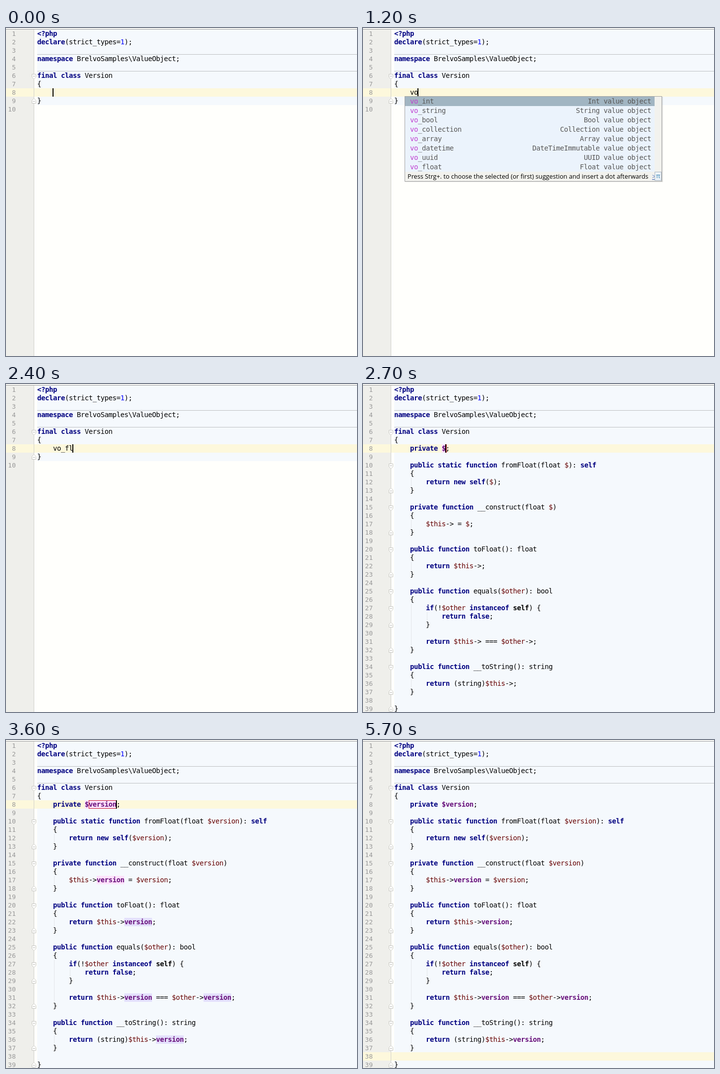
Animation of 709 by 664 pixels, one loop 6000 ms. Source, as an HTML page:

```html
<!DOCTYPE html>
<html lang="en">
<head>
<meta charset="utf-8">
<title>Live template typing</title>
<style>
  html, body { margin: 0; width: 100%; height: 100%; overflow: hidden; background: #fffffc; }
  svg { display: block; }
  text { font-family: "DejaVu Sans Mono", monospace; font-size: 14px; white-space: pre; }
  .num { font-size: 13px; fill: #999; }
  .kw { font-weight: bold; fill: #000080; }
  .strong { font-weight: bold; }
  .field { font-weight: bold; fill: #660e7a; }
  .var { fill: #660000; }
  .lit { fill: #0000ff; }
  .item { fill: #585858; }
  .hit { fill: #bf3fd0; }
  .hint { font-family: "Open Sans", sans-serif; font-size: 12.7px; }
  .link { fill: #4a6fc0; text-decoration: underline; }
</style>
</head>
<body>
<svg id="stage" width="709" height="664" viewBox="0 0 709 664"></svg>
<script>
const LOOP = 6000, LEFT = 63, CELL = 8, ROW = 17, TOP = 3;
const stage = document.getElementById('stage');

const HEAD = [
  '<?php', 'declare(strict_types=1);', '',
  'namespace BrelvoSamples\\ValueObject;', '',
  'final class Version', '{'
];
// "@" stands for the property name being typed
const BODY = `    private $@;

    public static function fromFloat(float $@): self
    {
        return new self($@);
    }

    private function __construct(float $@)
    {
        $this->@ = $@;
    }

    public function toFloat(): float
    {
        return $this->@;
    }

    public function equals($other): bool
    {
        if(!$other instanceof self) {
            return false;
        }

        return $this->@ === $other->@;
    }

    public function __toString(): string
    {
        return (string)$this->@;
    }
`.split('\n');

const KEYWORDS = new Set(('<?php declare namespace final class private public static ' +
  'function return new self if instanceof false').split(' '));
const FOLD_STARTS = [10, 15, 20, 25, 27, 34];
const FOLD_ENDS = [13, 18, 23, 29, 32, 37];
const GUIDES = [[4, 12, 12], [4, 17, 17], [4, 22, 22], [4, 27, 31], [8, 28, 28], [4, 36, 36]];
const ITEMS = [
  ['int', 'Int'], ['string', 'String'], ['bool', 'Bool'], ['collection', 'Collection'],
  ['array', 'Array'], ['datetime', 'DateTimeImmutable'], ['uuid', 'UUID'], ['float', 'Float']
];

const TYPED = [[0, ''], [1000, 'v'], [1100, 'vo'], [1500, 'vo_'], [1700, 'vo_f'], [1800, 'vo_fl']];
const NAME = [[2500, ''], [2800, 'v'], [3100, 'ver'], [3200, 'vers'],
  [3400, 'versi'], [3500, 'versio'], [3600, 'version']];
const CARET = [[0, true], [300, false], [1000, true], [4800, false], [5300, true], [5700, false]];

const valueAt = (steps, t) => steps.reduce((v, [start, next]) => t >= start ? next : v, steps[0][1]);
const within = (t, a, b) => t >= a && t < b;
const rowY = line => TOP + (line - 1) * ROW;
const colX = col => LEFT + col * CELL;
const escape = s => s.replace(/&/g, '&amp;').replace(/</g, '&lt;').replace(/>/g, '&gt;');
const rect = (x, y, w, h, fill, more = '') =>
  `<rect x="${x}" y="${y}" width="${w}" height="${h}" fill="${fill}" ${more}/>`;
const text = (x, y, s, cls = '') => `<text x="${x}" y="${y}" class="${cls}">${escape(s)}</text>`;

// Snap the monospaced faces to the 8px character grid
function fitGrid() {
  const rules = document.styleSheets[0];
  for (const [cls, selector] of [['', 'text'], ['num', '.num']]) {
    stage.innerHTML = text(0, 20, 'x'.repeat(100), cls);
    const advance = stage.firstChild.getComputedTextLength() / 100;
    rules.insertRule(`${selector} { letter-spacing: ${CELL - advance}px }`, rules.cssRules.length);
    stage.innerHTML = '';
    if (cls) continue;
    rules.insertRule('.hint, .num { letter-spacing: 0 }', rules.cssRules.length);
  }
}

function classOf(token, line) {
  if (token[0] === '$') return line === 8 ? 'field' : 'var';
  if (token === 'self' && line === 27) return 'strong';
  if (KEYWORDS.has(token)) return 'kw';
  return token === '1' ? 'lit' : '';
}

function codeLine(source, line) {
  const y = rowY(line) + 13;
  let out = '';
  for (const m of source.matchAll(/<\?php|->\w*|\$\w*|\w+|[^\s\w$]/g)) {
    const [token] = m, x = colX(m.index);
    if (token.startsWith('->')) {
      out += text(x, y, '->') + text(x + 2 * CELL, y, token.slice(2), 'field');
    } else {
      out += text(x, y, token, classOf(token, line));
    }
  }
  return out;
}

function fold(line, end) {
  const y = rowY(line) + (end ? 3.5 : 5.5);
  const shape = end ? 'm0 4l4-4l4 4v6h-8z' : 'h8v6l-4 4l-4-4z';
  const bar = y + (end ? 6 : 4);
  return `<path d="M52.5 ${y}${shape}" fill="#fffffc" stroke="#c6c6c2"/>` +
    `<path d="M54.5 ${bar}h4" stroke="#b4b4b0"/>`;
}

// Backgrounds behind every use of the property
function usages(name) {
  const w = name.length * CELL;
  let out = rect(colX(12), rowY(8), w + CELL, ROW, '#ffe2fc');
  BODY.forEach((source, i) => {
    let shift = 0;
    for (const m of source.matchAll(/@/g)) {
      if (source.slice(0, m.index).endsWith('->')) {
        out += rect(colX(m.index + shift), rowY(i + 8), w, ROW, i === 9 ? '#ffe2fc' : '#e4e0fc');
      }
      shift += name.length - 1;
    }
  });
  return out;
}

function popup(typed) {
  const list = ITEMS.filter(([name]) => ('vo_' + name).startsWith(typed));
  const full = list.length > 1;
  const foot = 139 + list.length * 19;
  const right = full ? 582 : 596;
  let out = rect(85, 139, 521, foot - 118, '#000', 'opacity=".1"') +
    rect(84.5, 138.5, 519, foot - 119, '#f2f2ee', 'stroke="#a2a2a2"') +
    rect(85, 139, full ? 504 : 518, foot - 139, '#ebf3fc') +
    rect(85, 139, full ? 504 : 518, 19, '#a1b5c2');
  list.forEach(([name, type], i) => {
    const y = 153 + i * 19, label = 'vo_' + name, note = type + ' value object';
    out += text(95, y, label.slice(0, typed.length), 'hit') +
      text(95 + typed.length * CELL, y, label.slice(typed.length), 'item') +
      text(right - note.length * CELL, y, note, 'item');
  });
  out += text(90, foot + 14,
    'Press Strg+. to choose the selected (or first) suggestion and insert a dot afterwards', 'hint') +
    text(584, foot + 14, '>>', 'hint link');
  if (full) {
    out += rect(589.5, foot + .5, 13, 17, '#edf3f8', 'stroke="#a9b6c2"') +
      `<text x="596" y="${foot + 13}" class="hint" fill="#2f7fae" text-anchor="middle">π</text>`;
  }
  return out;
}

function draw(t) {
  const expanded = t >= 2500, done = t >= 3800;
  const typed = valueAt(TYPED, t), name = valueAt(NAME, t);
  const lines = expanded
    ? [...HEAD, ...BODY.map(s => s.replaceAll('@', name)), '}']
    : [...HEAD, '    ' + typed, '}', ''];
  const last = expanded ? 39 : 9;
  const active = done ? 38 : 8;
  const col = done ? 4 : expanded ? 13 + name.length : 4 + typed.length;

  let out = rect(0, 0, 709, 664, '#fffffc') +
    rect(LEFT, TOP, 646, last * ROW, '#f5f9fd') +
    rect(0, TOP, 56, 661, '#efefeb') +
    rect(0, rowY(active), 709, ROW, '#fdf8dc') +
    rect(56, TOP, 1, 661, '#d0d0cc') +
    rect(0, 2, 709, 1, '#999') +
    rect(LEFT, 53, 646, 1, '#bdc0c2') +
    rect(LEFT, 87, 646, 1, '#bdc0c2');

  if (within(t, 2700, 3900)) out += usages(name);
  if (expanded) {
    for (const [c, from, to] of GUIDES) {
      out += rect(colX(c) + 2, rowY(from), 1, (to - from + 1) * ROW, '#e3e6e9');
    }
  }
  lines.forEach((source, i) => {
    const n = String(i + 1);
    out += text(20 - n.length * CELL, rowY(i + 1) + 13, n, 'num') + codeLine(source, i + 1);
  });

  out += fold(6, false) + fold(last, true);
  if (t >= 2700) {
    out += FOLD_STARTS.map(n => fold(n, false)).join('') + FOLD_ENDS.map(n => fold(n, true)).join('');
  }
  if (expanded && !done) {
    out += rect(colX(13) + .5, rowY(8) + .5, Math.max(1, name.length * CELL - 1), ROW - 1,
      'none', 'stroke="#c8102e"');
  }
  if (valueAt(CARET, t)) out += rect(colX(col) - 1, rowY(active), 2, ROW, '#000');
  if (within(t, 1200, 2400)) out += popup(typed);
  stage.innerHTML = out;
}

const CUTS = [...new Set([...TYPED, ...NAME, ...CARET].map(([start]) => start)
  .concat(1200, 2400, 2700, 3800, 3900))].sort((a, b) => a - b);
let shown = -1;

function tick(now) {
  const t = Math.max(0, now - begin) % LOOP;
  const cut = CUTS.filter(c => c <= t).pop();
  if (cut !== shown) draw(shown = cut);
  requestAnimationFrame(tick);
}

fitGrid();
const begin = performance.now();
tick(begin);
</script>
</body>
</html>
```
